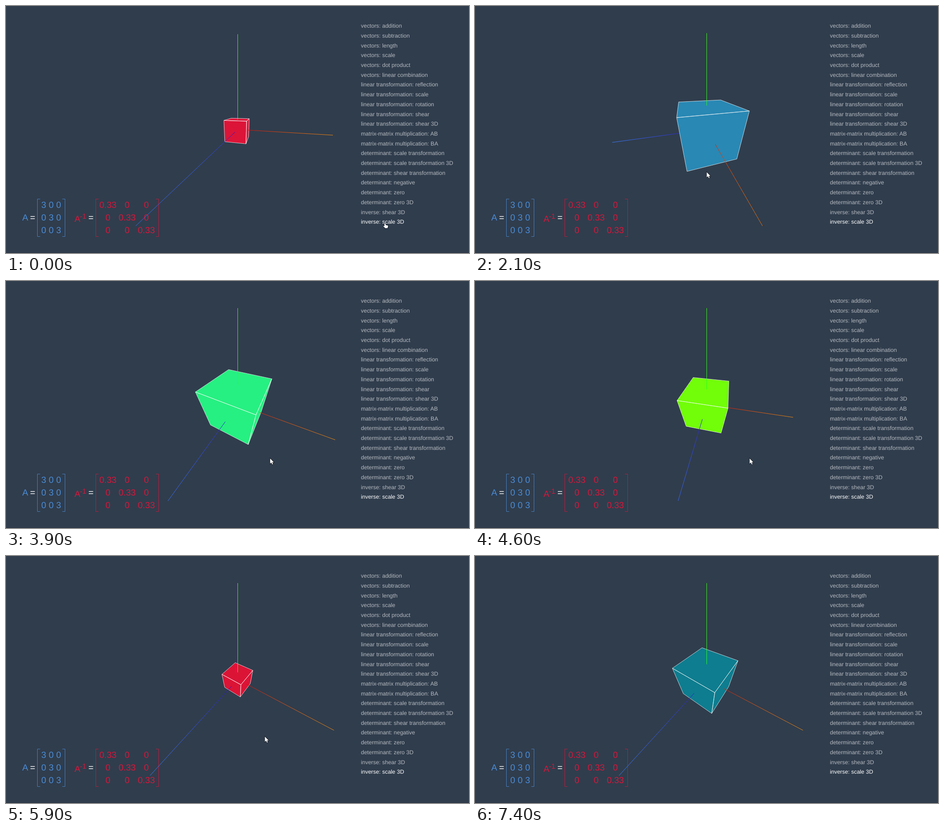
Write an HTML page with a canvas that moves like this. It is 1024 px wide and 547 px high and loops after 7500 ms.

```html
<!DOCTYPE html>
<html lang="en">
<head>
<meta charset="utf-8">
<title>Inverse: scale 3D</title>
<style>
  html, body { margin: 0; width: 100%; height: 100%; overflow: hidden; background: #303d4d; }
  canvas, svg { position: absolute; left: 0; top: 0; width: 1024px; height: 547px; }
  text { font-family: "Liberation Sans", Arial, sans-serif; text-rendering: geometricPrecision; }
  .menu { font-size: 12.45px; fill: #b4b9bf; }
  .menu.active { fill: #fff; }
  .matrix { font-size: 19.5px; text-anchor: middle; }
  path { fill: none; stroke-width: 1; stroke-opacity: .85; }
</style>
</head>
<body>
<svg id="labels" viewBox="0 0 1024 547"><rect y="546" width="1024" height="1" fill="#27323f"/></svg>
<canvas id="stage" width="1024" height="547"></canvas>
<script>
const LOOP = 7500, STEP = 100;
const CENTER = [512.5, 273.5], FOCAL = 177.6, AXIS = 0.948, HALF = 0.125;
const BLUE = '#4a8cd6', RED = '#d8163a';
const ctx = document.getElementById('stage').getContext('2d');
const labels = document.getElementById('labels');

const mix = (a, b, u) => a.map((v, i) => v + (b[i] - v) * u);
const clamp = (v, low, high) => Math.min(high, Math.max(low, v));
const smooth = u => u * u * (3 - 2 * u);

// --- Static labels ---
function addSvg(tag, attrs, text = '') {
  const el = document.createElementNS('http://www.w3.org/2000/svg', tag);
  for (const name in attrs) el.setAttribute(name, attrs[name]);
  el.textContent = text;
  labels.append(el);
}
const matrixText = (text, x, y, fill, size = 19.5) =>
  addSvg('text', { class: 'matrix', x, y, fill, style: `font-size:${size}px` }, text);

function matrix(value, left, right, gap, color) {
  addSvg('path', {
    stroke: color,
    d: `M${left + 6} 427.5H${left}V510.5H${left + 6}M${right - 6} 427.5H${right}V510.5H${right - 6}`
  });
  for (let r = 0; r < 3; r++) {
    for (let c = 0; c < 3; c++) {
      matrixText(r === c ? value : '0', (left + right) / 2 + (c - 1) * gap, 447 + 28 * r, color);
    }
  }
}

const topics = {
  'vectors': 'addition,subtraction,length,scale,dot product,linear combination',
  'linear transformation': 'reflection,scale,rotation,shear,shear 3D',
  'matrix-matrix multiplication': 'AB,BA',
  'determinant': 'scale transformation,scale transformation 3D,shear transformation,negative,zero,zero 3D',
  'inverse': 'shear 3D,scale 3D'
};
const menu = Object.entries(topics).flatMap(([topic, items]) => items.split(',').map(item => `${topic}: ${item}`));
menu.forEach((item, i) => addSvg('text', {
  class: i === menu.length - 1 ? 'menu active' : 'menu', x: 785, y: 48.2 + 21.7 * i
}, item));

matrixText('A', 42.5, 475, BLUE);
matrixText('=', 59, 475, '#fff');
matrix('3', 69.5, 130.5, 16.5, BLUE);
matrixText('A', 158, 477.5, RED);
matrixText('-1', 170.5, 470.5, RED, 16);
matrixText('=', 188, 475, '#fff');
matrix('0.33', 198.5, 337.5, 42.5, RED);

// --- Motion ---
// Places where the pointer rests: arrival, departure, x, y.
const rests = [
  [0, 700, 838, 482],
  [1200, 1200, 604, 344],
  [1300, 1300, 600, 346.6],
  [1900, 2200, 512.5, 368],
  [3000, 3200, 561, 393],
  [4600, 4800, 607.4, 393],
  [5700, 6000, 572.6, 400],
  [7000, LOOP, 85, -20]
];
const DRAG_START = 1200, DRAG_END = 5700;

function pointerAt(t) {
  const i = rests.findIndex(rest => t <= rest[1]);
  const [arrive, , ...to] = rests[i];
  if (t >= arrive) return to;
  const [, leave, ...from] = rests[i - 1];
  return mix(from, to, smooth((t - leave) / (arrive - leave)));
}

// The camera orbits at distance 1 from the origin, turned by the drag.
function cameraAt(t) {
  const [x, y] = pointerAt(clamp(t, DRAG_START, DRAG_END));
  const a = (14.1 + 0.658 * (604 - x)) * Math.PI / 180;
  const e = (13.75 + 0.64 * (y - 344)) * Math.PI / 180;
  const sa = Math.sin(a), ca = Math.cos(a), se = Math.sin(e), ce = Math.cos(e);
  const eye = [sa * ce, se, ca * ce];
  const project = ([x, y, z]) => {
    const k = FOCAL / (1 - x * eye[0] - y * eye[1] - z * eye[2]);
    return [
      CENTER[0] + k * (x * ca - z * sa),
      CENTER[1] - k * (y * ce - (x * sa + z * ca) * se)
    ];
  };
  return { eye, project };
}

// Small, middle and large cube colours: RGB while growing, HSL while shrinking.
const growColors = [[220, 20, 56], [8, 122, 134], [74, 150, 225]];
const shrinkColors = [[-10, 83, 47], [97, 100, 51.5], [220, 69, 59]];

function cubeAt(t) {
  const rise = 2920, middle = 0.435, u = t % 5970, growing = u < rise;
  const size = growing ? u / rise : Math.max(0, 2 - u / rise);
  const [small, mid, large] = growing ? growColors : shrinkColors;
  const [a, b, c] = size < middle
    ? mix(small, mid, size / middle)
    : mix(mid, large, (size - middle) / (1 - middle));
  return {
    half: HALF * (1 + 1.87 * size),
    color: growing ? `rgb(${a},${b},${c})` : `hsl(${a},${b}%,${c}%)`
  };
}

// --- Drawing ---
const axisColors = [
  [[200, 0, 10], [230, 138, 20]],
  [[30, 255, 30], [70, 245, 25]],
  [[40, 0, 185], [60, 125, 245]]
];
const onAxis = (i, v) => [0, 1, 2].map(j => j === i ? v : 0);

function drawAxis(i, half, { eye, project }) {
  const from = project(onAxis(i, half)), to = project(onAxis(i, AXIS));
  const gradient = ctx.createLinearGradient(...CENTER, ...to);
  const depth = AXIS * eye[i];
  // Perspective moves the colour steps towards the far end.
  for (let w = 0; w <= 1; w += 0.25) {
    gradient.addColorStop(w * (1 - depth) / (1 - w * depth), `rgb(${mix(...axisColors[i], w)})`);
  }
  ctx.strokeStyle = gradient;
  ctx.beginPath();
  ctx.moveTo(...from);
  ctx.lineTo(...to);
  ctx.stroke();
}

function facePath(i, half, project) {
  const path = new Path2D();
  for (const [u, v] of [[-1, -1], [1, -1], [1, 1], [-1, 1]]) {
    const p = [];
    p[i] = half;
    p[(i + 1) % 3] = u * half;
    p[(i + 2) % 3] = v * half;
    path.lineTo(...project(p));
  }
  path.closePath();
  return path;
}

function drawScene(t) {
  const { half, color } = cubeAt(t);
  const camera = cameraAt(t);
  const isFacing = i => camera.eye[i] > half;
  const facing = [0, 1, 2].filter(isFacing);
  const faces = facing.map(i => facePath(i, half, camera.project));

  ctx.save();
  ctx.beginPath();
  ctx.rect(0, 60, 1024, 427);
  ctx.clip();
  ctx.lineWidth = 1;
  ctx.lineJoin = 'round';
  [0, 1, 2].filter(i => !isFacing(i)).forEach(i => drawAxis(i, half, camera));
  ctx.fillStyle = color;
  faces.forEach(face => ctx.fill(face));
  // Edges shared by two faces are stroked twice and so look brighter.
  ctx.strokeStyle = 'rgba(255,255,255,.72)';
  faces.forEach(face => ctx.stroke(face));
  facing.forEach(i => drawAxis(i, half, camera));
  ctx.restore();
}

const arrow = new Path2D('M0 0V11.5L2.7 9L4.6 13.2L6.4 12.4L4.6 8.5H8.2Z');
const hand = new Path2D('M-1 0Q.3-1.5 1.6 0V3L6 4Q7.2 4.5 7 6L6 9V10H0V9L-3.5 6Q-3.5 4.2-1 5.5Z');

function drawPointer([x, y]) {
  const shape = x > 785 ? hand : arrow;
  ctx.save();
  ctx.translate(x, y);
  ctx.lineWidth = 1.6;
  ctx.strokeStyle = '#10151c';
  ctx.stroke(shape);
  ctx.fillStyle = '#fff';
  ctx.fill(shape);
  ctx.restore();
}

function frame(now) {
  const t = Math.floor(now % LOOP / STEP) * STEP;
  ctx.clearRect(0, 0, 1024, 547);
  drawScene(t);
  drawPointer(pointerAt(t));
  requestAnimationFrame(frame);
}
requestAnimationFrame(frame);
</script>
</body>
</html>
```
